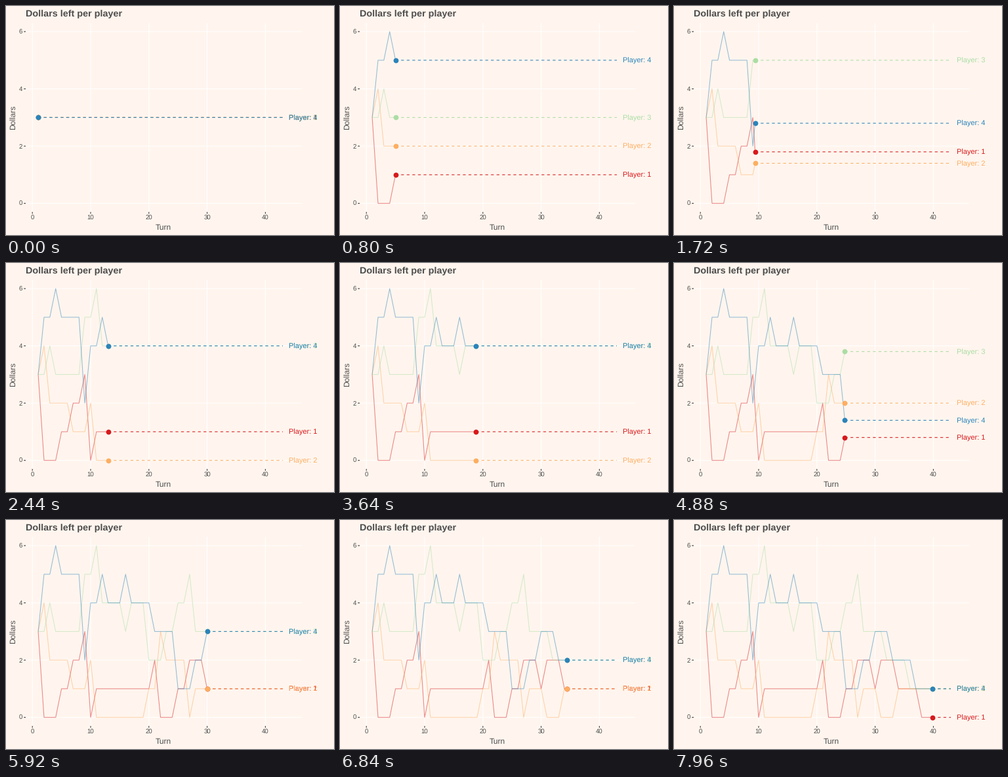
A matplotlib script that plays this animation: 500x350 px, repeating every 8 s.

```python
import numpy as np
import matplotlib.pyplot as plt
from matplotlib.animation import FuncAnimation

W, H, DPI = 500, 350, 100
PX = 72 / DPI  # points per pixel
FRAMES, INTERVAL = 200, 40
LINE = 1.07 * PX
BG, GREY, TICK = "#FFF5EE", "#4D4D4D", "#333333"
COLORS = ["#D7191C", "#FDAE61", "#ABDDA4", "#2B83BA"]
LEFT, RIGHT, TOP, BOTTOM = 30, 450, 26, 314.8

# Dollars passed left, right or to the centre; players roll in rotation.
ROLLS = ("LLR RC R R - L - LLR LLR LR RC C - - R L - - LC R "
         "RR R - LR - LR LR - L L C C R - C C C - -").split()


def play(rolls):
    cash = [3, 3, 3, 3]
    history = [cash[:]]
    for i, roll in enumerate(rolls):
        who = i % 4
        for side in roll.replace("-", ""):
            cash[who] -= 1
            if side != "C":
                cash[(who + (1 if side == "R" else -1)) % 4] += 1
        history.append(cash[:])
    return np.array(history).T


def sx(turn):
    return LEFT + (turn + 1.15) * (RIGHT - LEFT) / 47.3


def sy(dollars):
    return BOTTOM - (dollars + 0.3) * (BOTTOM - TOP) / 6.6


cash = play(ROLLS)
turns = np.arange(1, cash.shape[1] + 1)
# Each turn starts on a whole frame, so turns last five or six frames.
starts = np.round((turns - 1) * 215 / 42)

plt.rcParams["font.family"] = "Liberation Sans"
plt.rcParams["text.hinting"] = "none"
fig = plt.figure(figsize=(W / DPI, H / DPI), dpi=DPI, facecolor=BG)
ax = fig.add_axes([0, 0, 1, 1])
ax.set_xlim(0, W)
ax.set_ylim(H, 0)
ax.axis("off")


def stroke(xs, ys, color, **kw):
    kw = {"lw": LINE, "solid_capstyle": "butt", "solid_joinstyle": "round",
          "dash_capstyle": "butt", "snap": False, **kw}
    return ax.plot(xs, ys, color=color, **kw)[0]


def write(x, y, text, size, color=GREY, **kw):
    return ax.text(x, y, text, fontsize=size * PX, color=color,
                   va="baseline", **kw)


for v in range(0, 7, 2):
    y = sy(v)
    stroke([LEFT, RIGHT], [y, y], "white", zorder=1)
    stroke([LEFT - 2.75, LEFT], [y, y], TICK, zorder=1)
    write(25.05, y + 3.45, str(v), 9.6, ha="right")
for v in range(0, 50, 10):
    x = sx(v)
    if v > 40:
        break
    stroke([x, x], [TOP, BOTTOM], "white", zorder=1)
    stroke([x, x], [BOTTOM, BOTTOM + 2.75], TICK, zorder=1)
    write(x, 327, str(v), 9.6, ha="center")

write(LEFT, 16, "Dollars left per player", 14.4, weight="bold")
write(240, 342, "Turn", 12, ha="center")
ax.text(14, (TOP + BOTTOM) / 2, "Dollars", fontsize=12 * PX, color=GREY,
        rotation=90, rotation_mode="anchor", ha="center", va="baseline")

trails, leads, dots, labels = [], [], [], []
for i, c in enumerate(COLORS):
    trails.append(stroke([], [], c, alpha=0.5, zorder=2))
    leads.append(stroke([], [], c, linestyle=(0, (4, 4)), zorder=3))
    dots.append(stroke([], [], c, marker="o", ms=7.8 * PX, mew=0, zorder=4))
    labels.append(write(sx(44), 0, f"Player: {i + 1}", 11.04, c, zorder=5))


def update(k):
    now = np.interp(k, starts, turns)
    past = turns < now
    xs = sx(np.append(turns[past], now))
    for i in range(4):
        value = np.interp(now, turns, cash[i])
        x, y = sx(now), sy(value)
        trails[i].set_data(xs, sy(np.append(cash[i][past], value)))
        leads[i].set_data([x, sx(43)], [y, y])
        dots[i].set_data([x], [y])
        labels[i].set_y(y + 4)
    return trails + leads + dots + labels


anim = FuncAnimation(fig, update, frames=FRAMES, interval=INTERVAL,
                     repeat=True, repeat_delay=0, blit=False)
plt.show()
```
